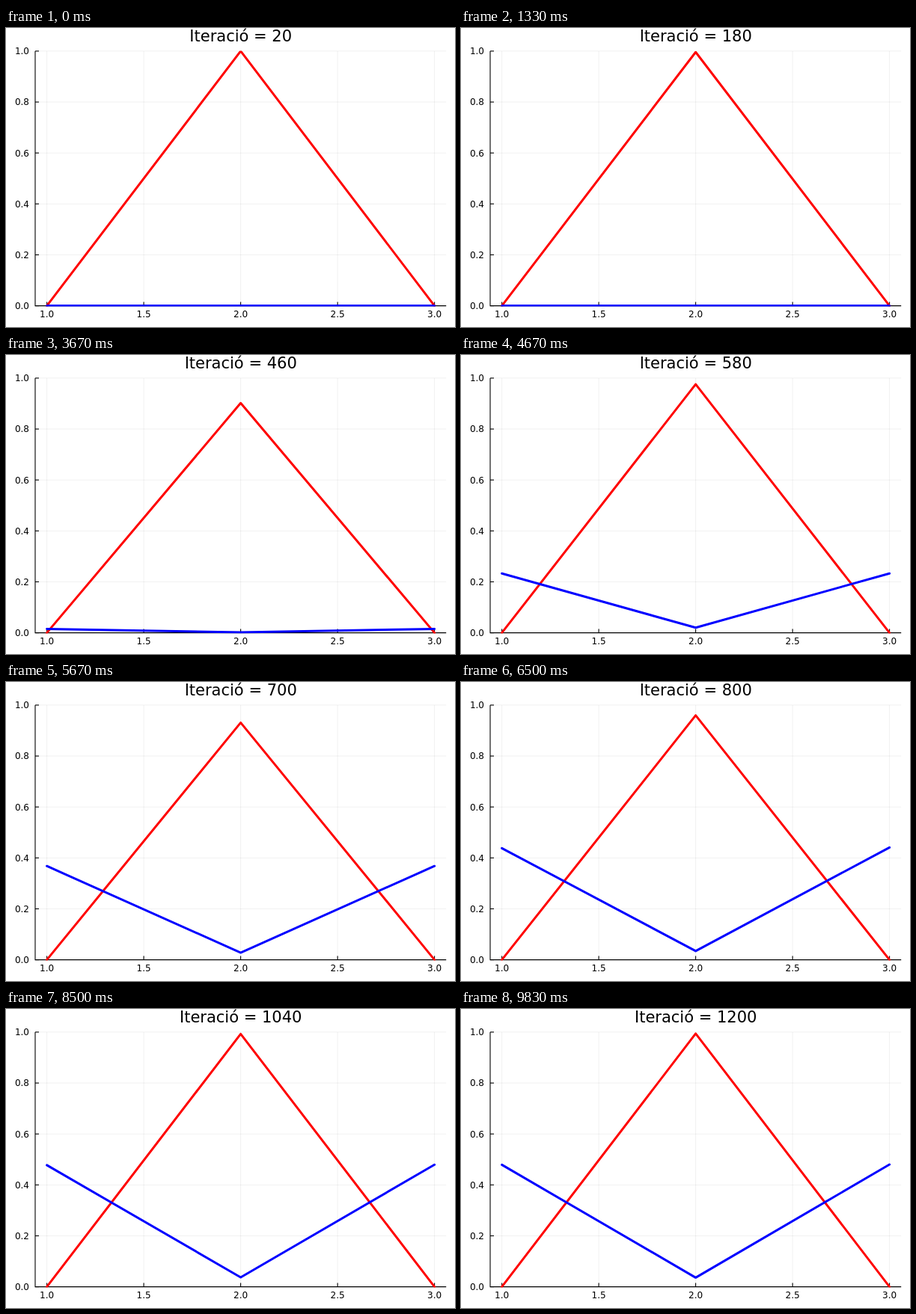
An HTML page for the animation above (9.99 s loop, 600x400 px).

```html
<!DOCTYPE html>
<html lang="ca">
<head>
<meta charset="utf-8">
<style>
html, body { margin: 0; width: 100%; height: 100%; overflow: hidden; background: #fff; }
svg { display: block; font: 12px "DejaVu Sans", sans-serif; }
#title { font-size: 21px; }
.grid { stroke: #000; stroke-opacity: .1; stroke-width: .6; }
.axis { stroke: #000; stroke-width: 1.1; fill: none; }
.curve { fill: none; stroke-width: 3; stroke-linejoin: round; stroke-linecap: round; }
</style>
</head>
<body>
<svg width="600" height="400" viewBox="0 0 600 400">
  <clipPath id="plot"><rect x="39" y="30.5" width="549.5" height="342"/></clipPath>
  <g id="axes"></g>
  <g clip-path="url(#plot)">
    <polyline id="red" class="curve" stroke="#f00"/>
    <polyline id="blue" class="curve" stroke="#00f"/>
  </g>
  <text id="title" x="313.7" y="18" text-anchor="middle"></text>
</svg>
<script>
const byId = id => document.getElementById(id);
const LEFT = 39, RIGHT = 588.2, TOP = 30.9, BOTTOM = 371.6;
const px = x => 54.6 + (x - 1) * 259;
const py = y => BOTTOM - y * (BOTTOM - TOP);

const line = (kind, x1, y1, x2, y2) =>
  `<line class="${kind}" x1="${x1}" y1="${y1}" x2="${x2}" y2="${y2}"/>`;
const label = (x, y, anchor, value) =>
  `<text x="${x}" y="${y}" text-anchor="${anchor}">${value.toFixed(1)}</text>`;

let axes = `<path class="axis" d="M${LEFT} ${TOP}V${BOTTOM}H${RIGHT}"/>`;
for (let i = 0; i <= 5; i++) {
  const y = py(i / 5);
  axes += line("grid", LEFT, y, RIGHT, y) + line("axis", LEFT, y, LEFT + 5, y)
    + label(31, y + 4.4, "end", i / 5);
}
for (let i = 0; i <= 4; i++) {
  const x = px(1 + i / 2);
  axes += line("grid", x, TOP, x, BOTTOM) + line("axis", x, BOTTOM, x, BOTTOM - 5)
    + label(x, 387.4, "middle", 1 + i / 2);
}
byId("axes").innerHTML = axes;

// Heights of the curve points at key iterations
const steps = [20, 160, 300, 380, 460, 580, 700, 900, 1200];
const peak = [1, .997, .984, .96, .902, .976, .931, .99, .994];
const left = [0, 0, .0005, .003, .015, .233, .368, .474, .479];
const mid = [0, 0, .0002, .0005, .002, .02, .028, .038, .036];
const right = [0, 0, .0005, .003, .015, .233, .368, .478, .48];

// Shape-preserving cubic interpolation
function valueAt(values, n) {
  const last = steps.length - 1;
  const secant = k => (values[k + 1] - values[k]) / (steps[k + 1] - steps[k]);
  const slope = k => {
    if (k === 0 || k === last) return 0;
    const a = secant(k - 1), b = secant(k);
    return a * b > 0 ? 2 * a * b / (a + b) : 0;
  };
  let k = 0;
  while (k < last - 1 && n > steps[k + 1]) k++;
  const h = steps[k + 1] - steps[k], s = (n - steps[k]) / h, r = 1 - s;
  return values[k] * (1 + 2 * s) * r * r + slope(k) * h * s * r * r
    + values[k + 1] * (3 - 2 * s) * s * s - slope(k + 1) * h * s * s * r;
}

const plot = (id, heights) => byId(id).setAttribute("points",
  heights.map((y, i) => `${px(i + 1)},${py(y)}`).join(" "));

let shown = 0;
function draw(now) {
  const n = 20 * (1 + Math.min(59, Math.floor((now % 9990 + 3.4) * .006)));
  if (n !== shown) {
    shown = n;
    byId("title").textContent = `Iteració = ${n}`;
    plot("red", [0, valueAt(peak, n), 0]);
    plot("blue", [left, mid, right].map(values => valueAt(values, n)));
  }
}

const start = performance.now();
function tick() {
  draw(performance.now() - start);
  requestAnimationFrame(tick);
}
tick();
</script>
</body>
</html>
```
